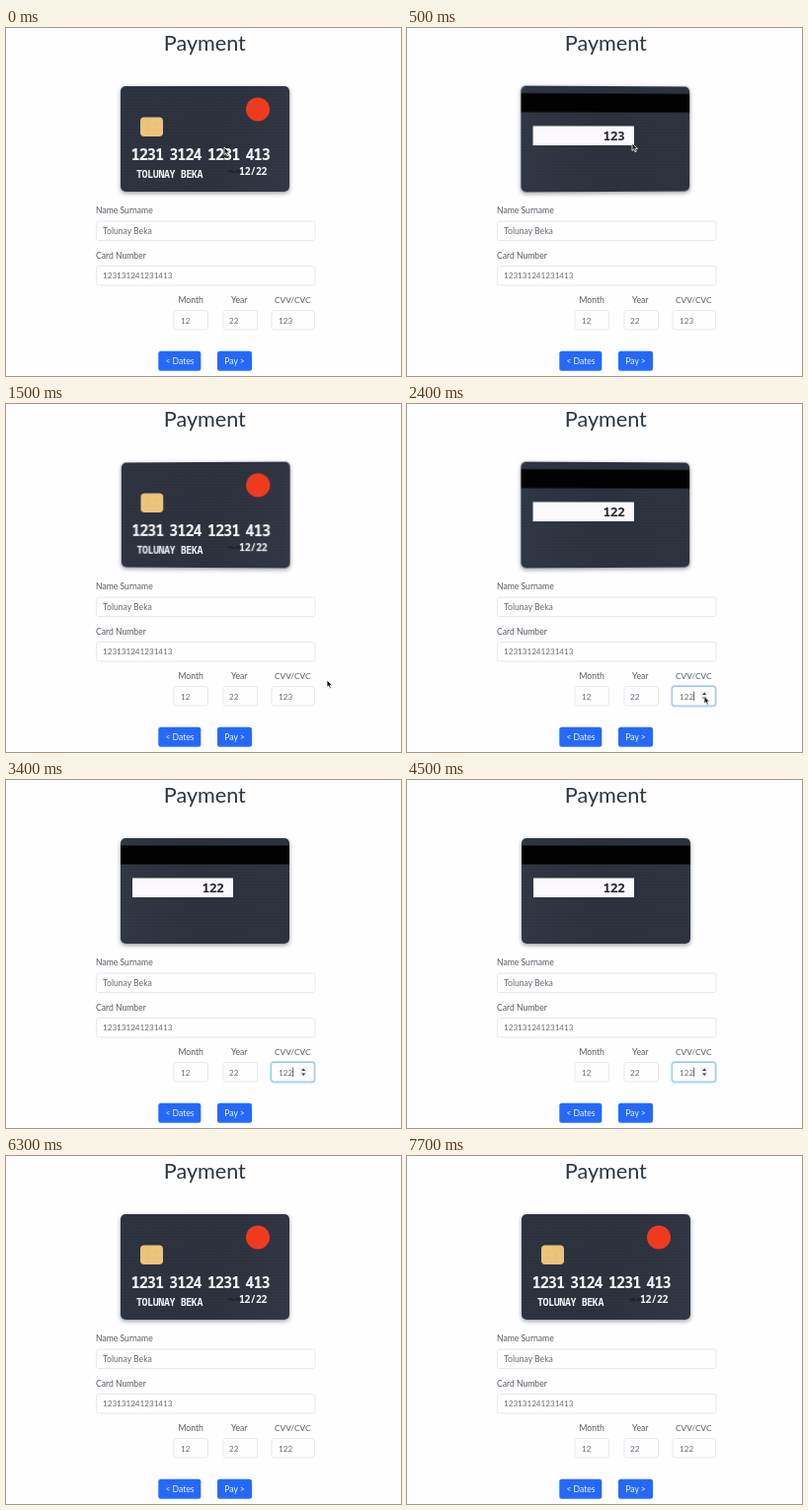
Write an HTML page that moves like this. It is 400 by 353 pixels and loops after 7.8 s.

```html
<!DOCTYPE html>
<html lang="en">
<head>
<meta charset="utf-8">
<title>Payment</title>
<style>
html, body { margin: 0; width: 100%; height: 100%; overflow: hidden; background: #fefdff; }
svg { position: absolute; left: 0; top: 0; overflow: visible; }
#page { font: 8.6px Lato, sans-serif; fill: #535b64; }
#page .value { fill: #666c74; }
#page .digits { font-size: 8.1px; }
#page .box { fill: #fefdff; stroke: #e3e4e8; stroke-width: .8; }
#page .button { fill: #2469fb; }
#page .white { fill: #f4f7ff; }
#scene { position: absolute; left: 116px; top: 59px; width: 171px; height: 107px; perspective: 510px; }
#card { width: 100%; height: 100%; border-radius: 5px; box-shadow: 0 1.5px 4px rgba(20, 25, 40, .45);
  background: repeating-linear-gradient(rgba(255, 255, 255, .015) 0 1px, transparent 1px 3px),
    linear-gradient(100deg, #2c333f, #2a303c 55%, #303744); }
#card svg { font-family: "Noto Sans Mono", "DejaVu Sans Mono", monospace; font-weight: 600; fill: #f4f5f7; }
#back { transform: scaleX(-1); }
</style>
</head>
<body>
<svg id="page" width="400" height="353">
  <text x="201.3" y="23" font-size="21.6" text-anchor="middle" fill="#2c3544">Payment</text>
  <text x="91" y="188">Name Surname</text>
  <text x="91" y="233.7">Card Number</text>
  <text x="174.5" y="279">Month</text>
  <text x="228" y="279">Year</text>
  <text x="272" y="279" font-size="8.3">CVV/CVC</text>
  <g class="box">
    <rect x="91.5" y="196" width="221.5" height="19.5" rx="2.5"/>
    <rect x="91.5" y="241.5" width="221.5" height="19.5" rx="2.5"/>
    <rect x="170" y="286.5" width="34.5" height="19.5" rx="2.5"/>
    <rect x="220" y="286.5" width="34.5" height="19.5" rx="2.5"/>
    <rect x="269" y="286.5" width="43.5" height="19.5" rx="2.5"/>
  </g>
  <g id="focus">
    <rect x="268.7" y="286.5" width="43.5" height="19.5" rx="2.5" fill="#fff" stroke="#bfdcff" stroke-width="3"/>
    <rect x="268.7" y="286.5" width="43.5" height="19.5" rx="2.5" fill="#fff" stroke="#82bbfa" stroke-width=".8"/>
    <path d="M290.7 291.5v9.5" stroke="#333" stroke-width=".8"/>
    <rect x="297" y="291" width="8.5" height="10.5" fill="#f4f4f6"/>
    <path d="M299 295l2.2-2.6 2.2 2.6zM299 297.5l2.2 2.6 2.2-2.6z" fill="#444"/>
  </g>
  <g class="value">
    <text x="98" y="208.8">Tolunay Beka</text>
    <g class="digits">
      <text x="98" y="254">123131241231413</text>
      <text x="177" y="299.5">12</text>
      <text x="226" y="299.5">22</text>
      <text x="276" y="299.5" data-cvv></text>
    </g>
  </g>
  <rect class="button" x="154.3" y="327.8" width="43" height="20" rx="2.5"/>
  <rect class="button" x="214" y="327.8" width="35" height="20" rx="2.5"/>
  <g class="white">
    <text x="176" y="341" text-anchor="middle">&lt; Dates</text>
    <text x="231.5" y="341" text-anchor="middle">Pay &gt;</text>
  </g>
</svg>

<div id="scene"><div id="card">
  <svg id="front" width="171" height="107">
    <rect x="20" y="31.5" width="23" height="19.5" rx="4" fill="#edc47c"/>
    <path d="M20 38h8v7h-8M43 38h-8v7h8" fill="none" stroke="#e0b56c" stroke-width=".5"/>
    <circle cx="139" cy="23.5" r="12" fill="#ee3b1f"/>
    <text x="10.5" y="75" font-size="15.3" letter-spacing="-1.03" word-spacing="-2.1">1231 3124 1231 413</text>
    <text x="16" y="93" font-size="10" letter-spacing="-.4">TOLUNAY BEKA</text>
    <text x="109" y="88" font-size="4" fill="#141820">VALID</text>
    <text x="120" y="90" font-size="10" letter-spacing="-.35">12/22</text>
  </svg>
  <svg id="back" width="171" height="107">
    <rect y="7.5" width="171" height="19" fill="#020203"/>
    <rect x="12" y="40.5" width="102" height="19.5" fill="#fcf9fc"/>
    <text x="82.5" y="55.5" font-size="13" letter-spacing="-.6" fill="#24272e" data-cvv></text>
  </svg>
</div></div>

<svg id="cursor" width="8" height="10">
  <path d="M0 0v7.4l1.700-1.500 1.200 2.800 1.400-.6-1.200-2.700h2.400z" fill="#111" stroke="#fff" stroke-width=".8"/>
</svg>

<script>
const LOOP = 7800, FLIP = 600;
const FOCUS = 1900, EDIT = 2150, BLUR = 5160;
const $ = id => document.getElementById(id);
const show = (el, on) => el.style.visibility = on ? "visible" : "hidden";

// start time and side shown (1 = back)
const flips = [[0, 1], [1000, 0], [FOCUS, 1], [BLUR, 0]];
// time, x, y of the pointer tip, one list per visible stretch
const tracks = [
  [[0, 221, 121], [300, 228, 117], [850, 228, 117], [1400, 325, 280],
   [1560, 325, 280], [1820, 301, 296.5], [2700, 301, 296.5]],
  [[4840, 301, 296.5], [5120, 338, 194], [5700, 338, 194], [6200, 404, 225]]
];

// CSS "ease": cubic-bezier(.25, .1, .25, 1)
function ease(x) {
  if (x >= 1) return 1;
  const curve = (a, b, s) => 3 * a * s * (1 - s) ** 2 + 3 * b * s * s * (1 - s) + s ** 3;
  let lo = 0, hi = 1;
  for (let i = 0; i < 20; i++) {
    const mid = (lo + hi) / 2;
    if (curve(.25, .25, mid) < x) lo = mid; else hi = mid;
  }
  return curve(.1, 1, lo);
}

function pointer(t) {
  const track = tracks.find(k => t >= k[0][0] && t < k[k.length - 1][0]);
  if (!track) return null;
  const i = track.findIndex(k => k[0] > t);
  const [t0, x0, y0] = track[i - 1], [t1, x1, y1] = track[i];
  const u = (t - t0) / (t1 - t0), s = u * u * (3 - 2 * u);
  return [x0 + (x1 - x0) * s, y0 + (y1 - y0) * s];
}

function draw(t) {
  const [start, side] = flips.filter(f => f[0] <= t).pop();
  const p = ease((t - start) / FLIP);
  const angle = -180 * (side ? p : 1 - p);
  $("card").style.transform = `rotateY(${angle}deg)`;
  show($("front"), angle > -90);
  show($("back"), angle <= -90);

  show($("focus"), t >= FOCUS && t < BLUR);
  const cvv = t < EDIT ? "123" : "122";
  document.querySelectorAll("[data-cvv]").forEach(el => el.textContent = cvv);

  const at = pointer(t);
  show($("cursor"), at);
  if (at) $("cursor").style.transform = `translate(${at[0]}px, ${at[1]}px)`;
}

const begin = performance.now();
function tick() {
  draw((performance.now() - begin) % LOOP);
  requestAnimationFrame(tick);
}
tick();
</script>
</body>
</html>
```
